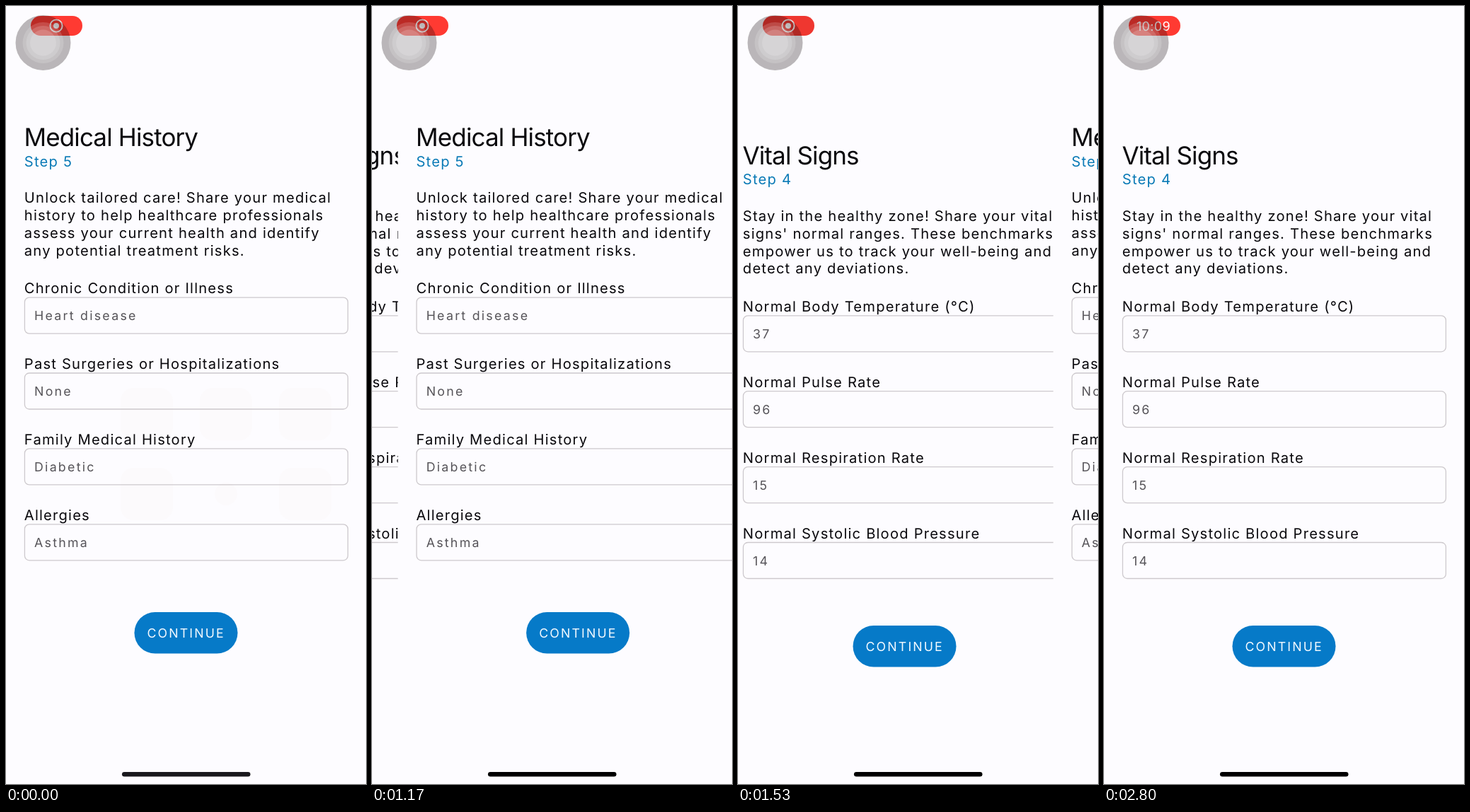
Write an HTML page that moves like this. It is 509 by 1100 pixels and loops after 2870 ms.

```html
<!DOCTYPE html>
<html lang="en">
<head>
<meta charset="utf-8">
<title>Health form</title>
<style>
  html, body { margin: 0; height: 100%; overflow: hidden; background: #fdfcff; }
  svg { display: block; width: 100%; height: 100%; }
  text {
    font: 20.2px Inter, "Open Sans", sans-serif;
    font-optical-sizing: none;
    letter-spacing: 1.19px;
    text-rendering: geometricPrecision;
    fill: #09080c;
  }
  .title { font-size: 35px; letter-spacing: -.86px; }
  .step { fill: #0a7ab6; }
  .value { font-size: 17.8px; letter-spacing: 2.25px; fill: #555358; }
  .action { font-size: 17.8px; letter-spacing: 2.1px; fill: #f4faff; }
  .field { fill: none; stroke: #cdc9cd; stroke-width: 1.3; }
  .button { fill: #067ac8; }
  #clock { font-size: 18px; letter-spacing: .3px; fill: #fff; }
</style>
</head>
<body>
<svg viewBox="0 0 509 1100" preserveAspectRatio="none">
  <rect width="509" height="1100" fill="#fdfcff"/>
  <g id="vitals"></g>
  <g id="history"></g>
  <g id="ghosts" fill="#c8a060" fill-opacity=".02"></g>

  <rect id="pill" x="35" y="14" width="73" height="28" rx="14"/>
  <g id="record" fill="none" stroke="#fff" stroke-width="1.9">
    <circle cx="71" cy="28" r="8.6"/>
    <circle cx="71" cy="28" r="4" fill="#fff" stroke="none"/>
  </g>
  <text id="clock" x="46" y="34.5">10:09</text>
  <circle cx="52.5" cy="52" r="39" fill="#0c0004" fill-opacity=".28"/>
  <g fill="#fff" fill-opacity=".16">
    <circle cx="52.5" cy="52" r="29"/>
    <circle cx="52.5" cy="52" r="24"/>
    <circle cx="52.5" cy="52" r="18.5"/>
  </g>
  <rect id="homeBar" x="164" y="1083" width="181.5" height="6.6" rx="3.3"/>
</svg>
<script>
const LOOP = 2870, WIDTH = 509, PARALLAX = 0.3;
const el = id => document.getElementById(id);
const clamp = v => Math.min(1, Math.max(0, v));
const ramp = (t, from, to) => clamp((t - from) / (to - from));

const text = (x, y, content, kind = '') =>
  `<text class="${kind}" x="${x}" y="${y}">${content}</text>`;
const box = (x, y, w, h, r, kind = '') =>
  `<rect class="${kind}" x="${x}" y="${y}" width="${w}" height="${h}" rx="${r}"/>`;

function page(title, step, lines, fields, top, buttonTop) {
  return `<rect width="${WIDTH}" height="1100" fill="#fdfcff"/>` +
    text(25.4, top + 198, title, 'title') +
    text(25.8, top + 226.7, step, 'step') +
    lines.map((line, i) => text(25.8, top + 278 + i * 24.9, line)).join('') +
    fields.map(([label, value], i) => {
      const y = top + i * 106.9;
      return text(25.8, y + 406.3, label) +
        box(26.4, y + 412.1, 457, 51, 6.5, 'field') +
        text(40, y + 444.4, value, 'value');
    }).join('') +
    box(181.5, buttonTop, 146, 58.5, 29.25, 'button') +
    text(199.5, buttonTop + 35.5, 'CONTINUE', 'action');
}

el('history').innerHTML = page('Medical History', 'Step 5', [
  'Unlock tailored care! Share your medical',
  'history to help healthcare professionals',
  'assess your current health and identify',
  'any potential treatment risks.'
], [
  ['Chronic Condition or Illness', 'Heart disease'],
  ['Past Surgeries or Hospitalizations', 'None'],
  ['Family Medical History', 'Diabetic'],
  ['Allergies', 'Asthma']
], 0, 857);

el('vitals').innerHTML = page('Vital Signs', 'Step 4', [
  'Stay in the healthy zone! Share your vital',
  "signs' normal ranges. These benchmarks",
  'empower us to track your well-being and',
  'detect any deviations.'
], [
  ['Normal Body Temperature (°C)', '37'],
  ['Normal Pulse Rate', '96'],
  ['Normal Respiration Rate', '15'],
  ['Normal Systolic Blood Pressure', '14']
], 25.7, 876);

// Faint remains of a grid of icons
el('ghosts').innerHTML = [
  [386, 540], [386, 653], [162, 540], [162, 653], [274, 540]
].map(([x, y]) => box(x, y, 74, 74, 18)).join('') +
  '<circle cx="311" cy="690" r="16"/>';

// Cubic Bézier easing, solved for x by bisection
function bezier(x1, y1, x2, y2) {
  const curve = (a, b, u) => 3 * (1 - u) ** 2 * u * a + 3 * (1 - u) * u * u * b + u ** 3;
  return x => {
    let low = 0, high = 1;
    for (let i = 0; i < 24; i++) {
      const mid = (low + high) / 2;
      if (curve(x1, x2, mid) < x) low = mid; else high = mid;
    }
    return x <= 0 ? 0 : x >= 1 ? 1 : curve(y1, y2, low);
  };
}
const slide = bezier(.38, .115, .44, 1);

function draw(now) {
  const t = now % LOOP;
  const p = slide(ramp(t, 1090, 1740));
  el('history').setAttribute('transform', `translate(${WIDTH * p})`);
  el('vitals').setAttribute('transform', `translate(${-PARALLAX * WIDTH * (1 - p)})`);

  const dim = Math.sin(Math.PI * ramp(t, 1250, 2750)) ** 2;
  el('pill').setAttribute('fill', `rgb(${255 - 53 * dim},${58 - 9 * dim},${50 - 6 * dim})`);
  el('record').setAttribute('opacity', 1 - ramp(t, 2150, 2500));
  el('clock').setAttribute('opacity', ramp(t, 2110, 2460));

  const fade = 1 - ramp(t, 30, 500);
  el('ghosts').setAttribute('opacity', fade);
  el('homeBar').setAttribute('fill', `rgb(${26 * fade},${25 * fade},${29 * fade})`);
  requestAnimationFrame(draw);
}
requestAnimationFrame(draw);
</script>
</body>
</html>
```
